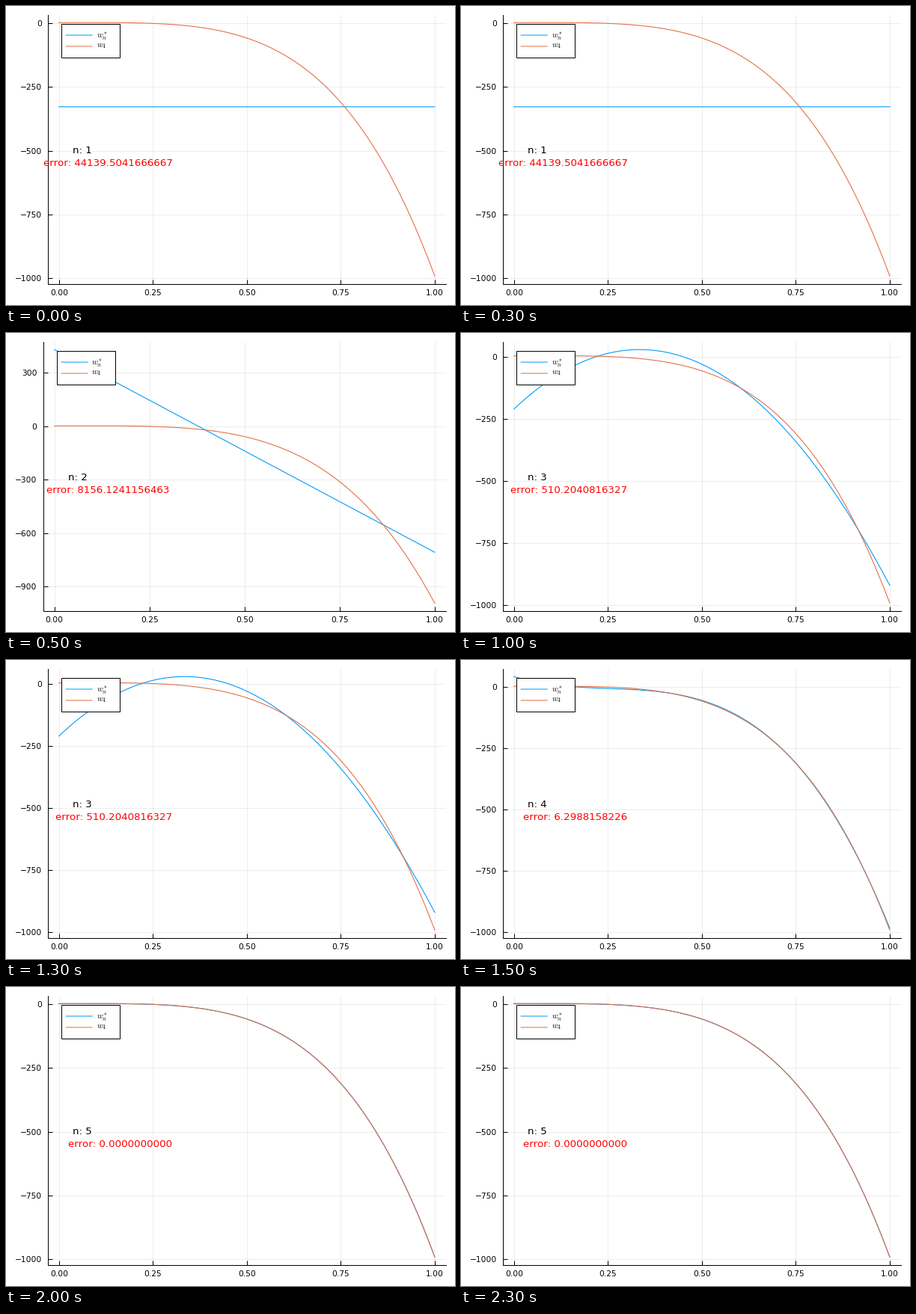
Write a matplotlib script that moves like this. It is 600 px wide and 400 px high and loops after 2500 ms.

```python
import numpy as np
import matplotlib.pyplot as plt
from matplotlib.animation import FuncAnimation
from matplotlib.patches import Rectangle
from matplotlib.transforms import Affine2D

plt.rcParams.update({"font.family": "DejaVu Sans", "mathtext.fontset": "cm"})

W, H, DPI = 600, 400, 100
TOP, BOTTOM, RIGHT = 12, 371.5, 588
PAD = 0.03
BLUE, ORANGE = "#009AFA", "#E36F47"
PT = 72 / DPI  # points per pixel

# Quartic to approximate, lowest power first
QUARTIC = np.array([3, 3.5, 1, 0, -1000])
ERRORS = ["44139.5041666667", "8156.1241156463", "510.2040816327",
          "6.2988158226", "0.0000000000"]

fig = plt.figure(figsize=(W / DPI, H / DPI), dpi=DPI, facecolor="white")
ax = fig.add_axes([0, 0, 1, 1])
# Pixel coordinates with the origin at the top left
PX = Affine2D().scale(1 / DPI, -1 / DPI).translate(0, H / DPI) + fig.dpi_scale_trans

xs = np.linspace(0, 1, 400)


def best_fit(n):
    """Least-squares fit with n coefficients on [0, 1], weight x."""
    rows = np.arange(n)[:, None]
    gram = 1 / (rows + np.arange(n) + 2)
    moments = 1 / (rows + np.arange(5) + 2)
    return np.linalg.solve(gram, moments @ QUARTIC)


def value(coefs):
    return np.polyval(coefs[::-1], xs)


def text(x, y, label, size, **style):
    ax.text(x, y, label, fontsize=size * PT, transform=PX,
            va="baseline", zorder=8, **style)


def legend(left):
    ax.add_patch(Rectangle((left, 23.5), 78.5, 45.5, transform=PX, fc="white",
                           ec="black", lw=PT, zorder=6, clip_on=False))
    rows = [(39, 43, "$w_n^*$", BLUE), (54, 55.5, "$w_4$", ORANGE)]
    for y, base, label, color in rows:
        ax.plot([left + 6, left + 42], [y, y], color=color, lw=PT,
                transform=PX, zorder=7, snap=False, solid_capstyle="butt")
        text(left + 47, base, label, 11)


def draw(i):
    n = i + 1
    left = 49.5 if n == 2 else 55.7
    fit, curve = value(best_fit(n)), value(QUARTIC)
    low = min(fit.min(), curve.min())
    high = max(fit.max(), curve.max())
    margin = PAD * (high - low)
    low, high = low - margin, high + margin

    def to_x(v):
        return left + (v + PAD) / (1 + 2 * PAD) * (RIGHT - left)

    def to_y(v):
        return TOP + (high - v) / (high - low) * (BOTTOM - TOP)

    ax.clear()
    ax.set_position([left / W, 1 - BOTTOM / H,
                     (RIGHT - left) / W, (BOTTOM - TOP) / H])
    ax.plot(xs, fit, color=BLUE, lw=1.1 * PT, snap=False)
    ax.plot(xs, curve, color=ORANGE, lw=1.1 * PT, snap=False)
    ax.set_xlim(-PAD, 1 + PAD)
    ax.set_ylim(low, high)

    xticks = np.linspace(0, 1, 5)
    yticks = range(-900, 301, 300) if n == 2 else range(-1000, 1, 250)
    ax.set_xticks(xticks)
    ax.set_yticks(list(yticks))
    ax.tick_params(direction="in", length=6 * PT, width=PT,
                   labelleft=False, labelbottom=False)
    ax.set_axisbelow(True)
    ax.grid(color="black", alpha=0.07, lw=PT)
    for side, spine in ax.spines.items():
        spine.set_visible(side in ("left", "bottom"))
        spine.set_linewidth(PT)

    for v in xticks:
        text(to_x(v), 387, f"{v:.2f}", 10.67, ha="center")
    for v in yticks:
        text(left - 8, to_y(v) + 4, str(v).replace("-", "\u2212"), 10.67, ha="right")

    text(to_x(0.036), 197, f"n: {n}", 13.33)
    text(to_x(0.302), 214, f"error: {ERRORS[i]}", 13.33, color="red", ha="right")
    legend(left + 18)
    return []


anim = FuncAnimation(fig, draw, frames=5, interval=500, repeat=True,
                     repeat_delay=0, init_func=lambda: draw(0))
plt.show()
```
